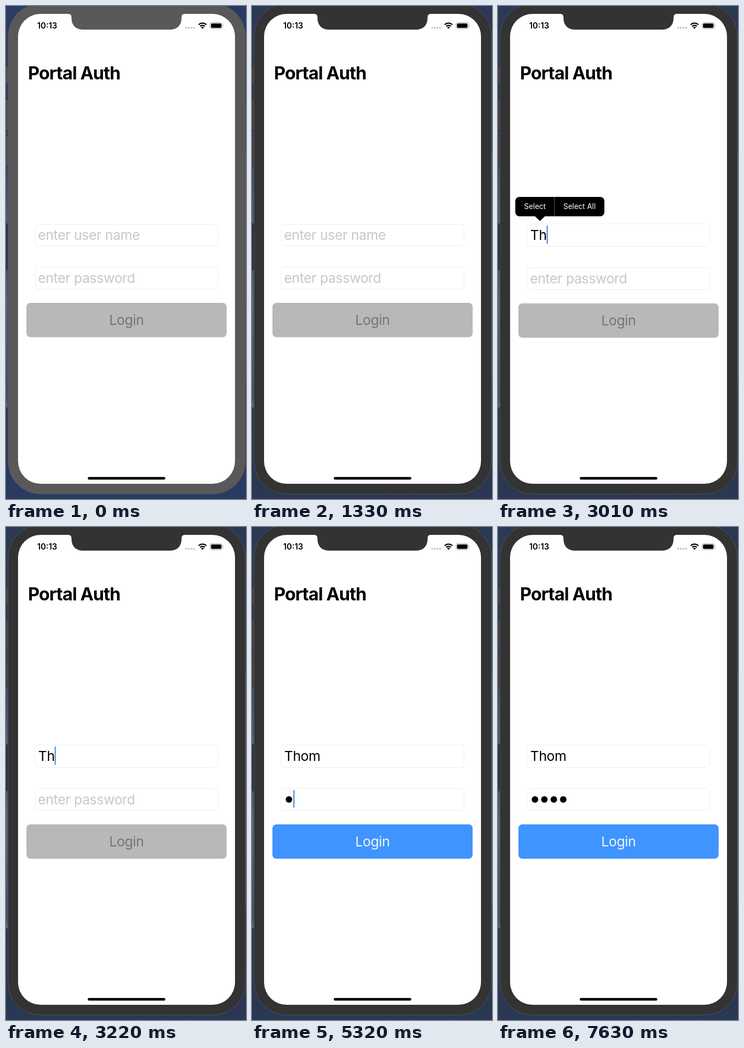
Recreate the animation shown at these times as an HTML page. Size 458 by 940 pixels, loop 7.84 s.

```html
<!DOCTYPE html>
<html lang="en">
<head>
<meta charset="utf-8">
<title>Portal Auth</title>
<style>
html, body { margin: 0; width: 100%; height: 100%; overflow: hidden; background: #2b374f; }
svg { display: block; width: 458px; height: 940px; }
text { font-family: Inter, "Liberation Sans", sans-serif; font-optical-sizing: none; white-space: pre; }
.entry { font-size: 26px; letter-spacing: -0.4px; }
.hint { fill: #c8c8c9; }
.field { fill: #fff; stroke: #eeeeef; }
.menu { font-size: 14px; fill: #fff; text-anchor: middle; }
</style>
</head>
<body>
<svg viewBox="0 0 458 940">
  <defs>
    <linearGradient id="left" x1="0" y1="0" x2="0" y2="1">
      <stop offset="0" stop-color="#2c3a57"/>
      <stop offset=".2" stop-color="#2a3654"/>
      <stop offset=".32" stop-color="#3c4a66"/>
      <stop offset=".44" stop-color="#525f78"/>
      <stop offset=".442" stop-color="#272e40"/>
      <stop offset=".535" stop-color="#2a3144"/>
      <stop offset=".537" stop-color="#4a566e"/>
      <stop offset=".6" stop-color="#5a6478"/>
      <stop offset=".79" stop-color="#444f68"/>
      <stop offset=".813" stop-color="#5c667a"/>
      <stop offset=".815" stop-color="#28344f"/>
      <stop offset="1" stop-color="#2a3854"/>
    </linearGradient>
    <linearGradient id="right" x1="0" y1="0" x2="0" y2="1">
      <stop offset="0" stop-color="#2a3854"/>
      <stop offset=".19" stop-color="#2a3650"/>
      <stop offset=".3" stop-color="#77787c"/>
      <stop offset=".75" stop-color="#5f626c"/>
      <stop offset=".78" stop-color="#2a3144"/>
      <stop offset="1" stop-color="#2a3854"/>
    </linearGradient>
  </defs>

  <rect width="229" height="940" fill="url(#left)"/>
  <rect x="229" width="229" height="940" fill="url(#right)"/>
  <rect id="tint" width="458" height="940" fill="#2a4590" opacity=".22"/>
  <g id="keys" stroke="#22252c">
    <rect x="-2" y="114.5" width="10" height="34"/>
    <rect x="-2" y="177.5" width="10" height="60"/>
    <rect x="-2" y="246.5" width="10" height="60"/>
    <rect x="450" y="177.5" width="12" height="100"/>
  </g>
  <rect id="bezel" x="4" y="-4.5" width="453" height="935" rx="62" stroke="#50525a"/>
  <rect x="23" y="15" width="414" height="896" rx="43" fill="#fff"/>
  <path id="notch" d="M119 14V15Q125 15 125 22C125 37 133 45 148 45H312C327 45 335 37 335 22Q335 15 341 15V14Z"/>

  <text x="59.5" y="43" font-size="15.5" font-weight="600">10:13</text>
  <g fill="#c9c9ca">
    <circle cx="344" cy="41.5" r="1.9"/><circle cx="349" cy="41.5" r="1.9"/>
    <circle cx="354" cy="41.5" r="1.9"/><circle cx="359" cy="41.5" r="1.9"/>
  </g>
  <g fill="none" stroke="#000" stroke-width="2.3">
    <path d="M367.6 35.7A10.5 10.5 0 0 1 382.4 35.7"/>
    <path d="M370.4 38.8A6.6 6.6 0 0 1 379.6 38.8"/>
  </g>
  <path d="M375 43.6L372.3 40.9A3.9 3.9 0 0 1 377.7 40.9Z"/>
  <rect x="389.5" y="31.5" width="23.5" height="12" rx="3.5" fill="none" stroke="#a5a5a5"/>
  <rect x="391.2" y="33.2" width="20" height="8.6" rx="2"/>
  <path d="M414 35.5Q416 37.5 414 39.5Z" fill="#a5a5a5"/>

  <text x="42" y="139.5" font-size="34" font-weight="700" letter-spacing="-1">Portal Auth</text>

  <rect id="userBox" class="field" x="55.5" width="349" rx="5"/>
  <text id="userHint" class="entry hint" x="61" y="446">enter user name</text>
  <text id="user" class="entry" x="61.5" y="446"></text>

  <g id="lower">
    <rect class="field" x="55.5" y="497.5" width="349" height="42" rx="5"/>
    <text id="passHint" class="entry hint" x="61" y="528">enter password</text>
    <rect id="button" x="39" y="566" width="382" height="65.5" rx="7.5"/>
    <text id="login" class="entry" x="230" y="608" text-anchor="middle">Login</text>
  </g>
  <g id="dots"></g>
  <rect id="caret" width="2" fill="#3d86d6"/>

  <g id="menu">
    <rect x="33" y="364" width="170" height="37" rx="8"/>
    <path d="M70 400.5H90L80 410Z"/>
    <path d="M107.5 364V401" stroke="#5a5a5a"/>
    <text class="menu" x="70.5" y="387">Select</text>
    <text class="menu" x="155.5" y="387">Select All</text>
  </g>
  <rect x="156" y="898" width="148" height="5" rx="2.5"/>
</svg>
<script>
const LOOP = 7840, STEP = 70;
const NAME = "Thom";
const FOCUS_WINDOW = 1330, FOCUS_USER = 2030, FOCUS_PASS = 4900;
const USER_KEYS = [2170, 3010, 3360, 4410];
const PASS_KEYS = [5320, 5460, 5740, 5810];
const EVENTS = [FOCUS_USER, ...USER_KEYS, FOCUS_PASS, ...PASS_KEYS];

const $ = id => document.getElementById(id);
const set = (id, attrs) => {
  for (const k in attrs) $(id).setAttribute(k, attrs[k]);
};
const clamp = v => Math.max(0, Math.min(1, v));
const count = (times, t) => times.filter(k => k <= t).length;

const dots = PASS_KEYS.map((_, i) => {
  const c = document.createElementNS("http://www.w3.org/2000/svg", "circle");
  c.setAttribute("cx", 70.5 + 18 * i);
  c.setAttribute("cy", 519.5);
  c.setAttribute("r", 6.2);
  return $("dots").appendChild(c);
});

// Steady after a key press, then fading out and in every 1120 ms.
function blink(age) {
  const phase = age % 1120;
  if (phase >= 530) return clamp((690 - phase) / 160);
  return age < 1120 ? 1 : clamp((phase + 35) / 210);
}

function drawCaret(t, typed, hidden) {
  if (t < FOCUS_USER) return set("caret", { opacity: 0 });
  const last = EVENTS[count(EVENTS, t) - 1];
  const inPass = t >= FOCUS_PASS;
  const nameEnd = typed ? 61.5 + $("user").getComputedTextLength() : 61.5;
  set("caret", {
    x: inPass ? 61 + 18 * hidden : nameEnd,
    y: inPass ? 501.5 : 418.5,
    height: inPass ? 33.5 : 35,
    opacity: blink(t - last)
  });
}

function draw(t) {
  const active = t >= FOCUS_WINDOW;
  const typed = count(USER_KEYS, t);
  const hidden = count(PASS_KEYS, t);
  const frame = active ? "#333" : "#595959";

  set("bezel", { fill: frame });
  set("notch", { fill: frame });
  set("keys", { fill: active ? "#424242" : "#515151" });
  set("tint", { opacity: active ? 0 : 0.22 });

  $("user").textContent = NAME.slice(0, typed);
  set("userHint", { opacity: typed ? 0 : 1 });
  set("userBox", { y: typed ? 415.5 : 416.5, height: typed ? 43 : 41 });
  set("lower", { transform: `translate(0 ${typed ? 1 : 0})` });

  set("passHint", { opacity: hidden ? 0 : 1 });
  dots.forEach((d, i) => d.setAttribute("opacity", i < hidden ? 1 : 0));

  const press = clamp(Math.min((t - 6300) / 140, (6720 - t) / 280));
  set("button", { fill: hidden ? "#3f94ff" : "#b8b8b8" });
  set("login", { fill: hidden ? "#f1f6fc" : "#757577", opacity: 1 - 0.55 * press });

  set("menu", { opacity: clamp(Math.min((t - 2660) / 210, (3220 - t) / 210)) });
  drawCaret(t, typed, hidden);
}

const start = performance.now();
function tick() {
  const t = (performance.now() - start) % LOOP;
  draw(Math.floor(t / STEP) * STEP);
  requestAnimationFrame(tick);
}
draw(0);
requestAnimationFrame(tick);
</script>
</body>
</html>
```
